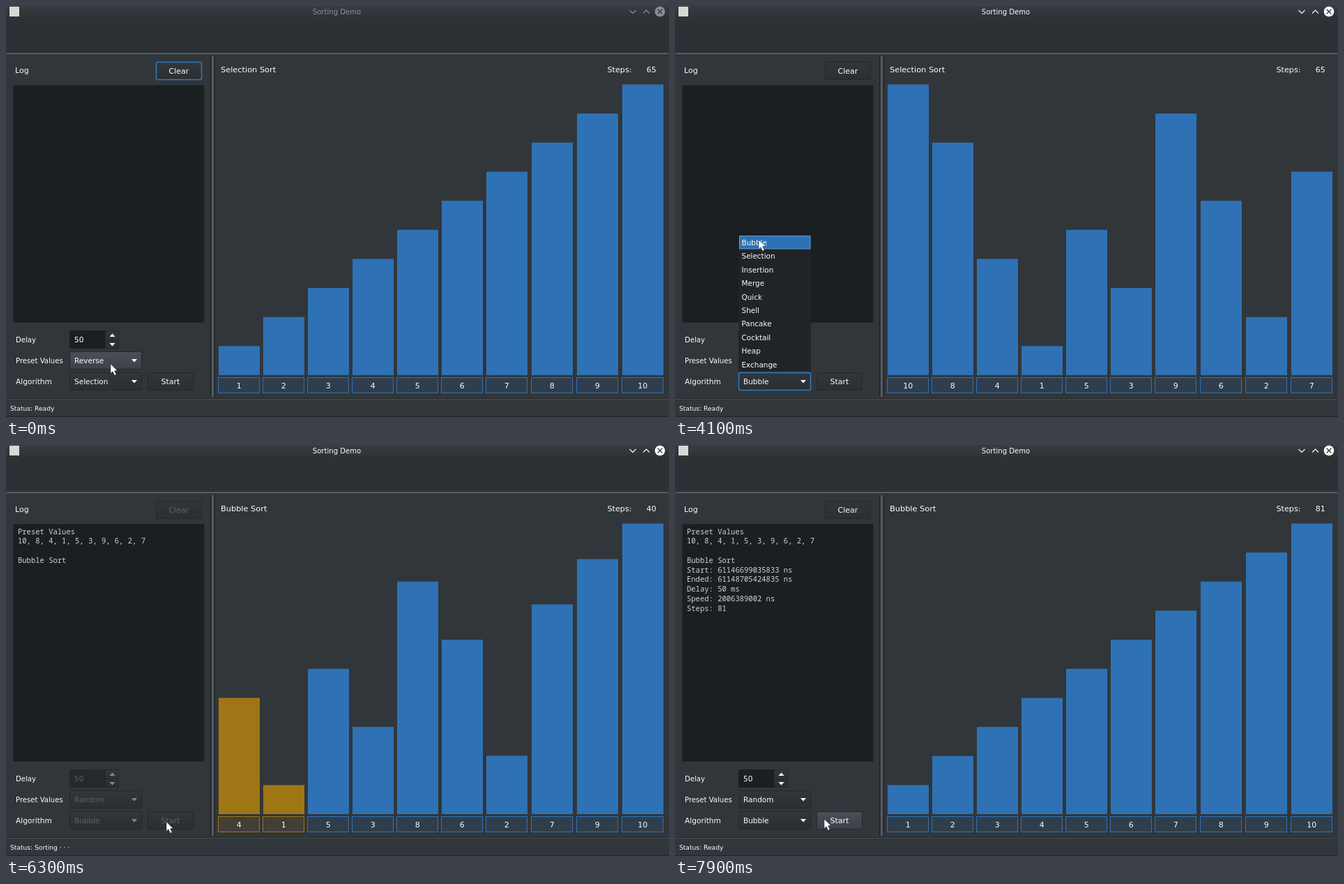
These frames come from a looping animation (951 px wide and 589 px high, 8 s). An HTML page:

```html
<!DOCTYPE html>
<html lang="en">
<head>
<meta charset="utf-8">
<title>Sorting Demo</title>
<style>
  html, body { margin: 0; width: 100%; height: 100%; overflow: hidden; background: #31363a; }
  svg { display: block; width: 951px; height: 589px; }
  text { font-family: "DejaVu Sans", sans-serif; fill: #fcfcfc; white-space: pre; }
  .mono { font: 10.53px "Noto Sans Mono", monospace; fill: #cfd3d5; }
  .mid { text-anchor: middle; }
  .end { text-anchor: end; }
</style>
</head>
<body>
<svg viewBox="0 0 951 589">
  <defs>
    <linearGradient id="bar" x2="0" y2="1">
      <stop offset="0" stop-color="#373c41"/><stop offset="1" stop-color="#2d3135"/>
    </linearGradient>
    <linearGradient id="btn" x2="0" y2="1">
      <stop offset="0" stop-color="#32363a"/><stop offset="1" stop-color="#2b2f33"/>
    </linearGradient>
    <linearGradient id="lit" x2="0" y2="1">
      <stop offset="0" stop-color="#4a4f57"/><stop offset="1" stop-color="#3c4148"/>
    </linearGradient>
  </defs>
  <rect width="951" height="589" fill="#31363a"/>
  <rect width="951" height="19" fill="url(#bar)"/>
  <rect y="19" width="951" height="49" fill="#2d3034"/>
  <rect x="1" y="67.5" width="949" height="1.2" fill="#75787a"/>
  <rect x="5" y="1" width="14" height="14" fill="#d9d8d6"/>
  <rect x="293" y="72" width="1" height="488" fill="#1f2326"/>
  <rect x="295" y="72" width="3" height="488" fill="#54585b"/>
  <rect x="299" y="72" width="1" height="488" fill="#1f2326"/>
  <rect y="562" width="951" height="1" fill="#24282b"/>
  <rect y="563" width="951" height="1" fill="#4b5053"/>
  <rect y="588" width="951" height="1" fill="#202427"/>
  <rect x="10.5" y="113.5" width="274" height="340" rx="1" fill="#1a2022" stroke="#24292c"/>
  <text x="13" y="95.5" font-size="11">Log</text>
  <text x="14" y="482" font-size="10.1">Delay</text>
  <text x="14" y="512" font-size="10.1">Preset Values</text>
  <text x="14" y="542" font-size="10.6">Algorithm</text>
  <text x="862.5" y="94.5" font-size="11.2">Steps:</text>
  <g id="live"></g>
</svg>
<script>
const LOOP = 8000, TICK = 100;
const BLUE = '#2e72b5', GOLD = '#a07516', FOCUS = '#2f7cbd';
const PRESETS = ['Random', 'Ordered', 'Reverse', 'Hundreds', 'Thousands'];
const SORTS = ['Bubble', 'Selection', 'Insertion', 'Merge', 'Quick', 'Shell',
  'Pancake', 'Cocktail', 'Heap', 'Exchange'];
const SHUFFLED = [10, 8, 4, 1, 5, 3, 9, 6, 2, 7];
const SHUFFLE_AT = 1370, SORT_AT = 5286, STEP = 25.2, SORT_UI = 5350, DONE = 7330;
const LAG = 108, GLOW = 6, EASE = 11;
const ROW = 19.45;

// Pointer positions: time, x, y
const PATH = [
  [0, 150, 513], [200, 150, 513], [900, 133, 427], [1100, 130, 407], [1400, 130, 406],
  [2100, 172, 529], [2300, 158, 540], [2400, 158, 540], [2600, 176, 541], [2800, 176, 541],
  [2900, 174, 543], [3100, 174, 543], [3700, 128, 351], [4000, 120, 335], [4300, 120, 335],
  [5100, 230, 540], [7200, 230, 540], [7600, 214, 536], [8000, 214, 536]
];

// Every pass, comparison and swap counts as one step
function bubbleSteps(list) {
  const a = [...list], swaps = [];
  let step = 0;
  for (let end = a.length - 1; end >= 0; end--) {
    step++;
    for (let i = 0; i < end; i++) {
      step++;
      if (a[i] > a[i + 1]) {
        [a[i], a[i + 1]] = [a[i + 1], a[i]];
        swaps.push({ i, at: SORT_AT + ++step * STEP });
      }
    }
  }
  return { swaps, total: step };
}
const { swaps, total } = bubbleSteps(SHUFFLED);

function pointer(t) {
  const n = PATH.findIndex(p => p[0] > t);
  const [t0, x0, y0] = PATH[n - 1], [t1, x1, y1] = PATH[n];
  const k = (t - t0) / (t1 - t0);
  return [x0 + (x1 - x0) * k, y0 + (y1 - y0) * k];
}

function barsAt(t) {
  const bars = SHUFFLED.map((_, i) => ({ value: i + 1, from: i + 1, at: -1e4, hot: false }));
  const height = (b, now) => b.value + (b.from - b.value) * Math.exp((b.at - now) / EASE);
  const set = (b, value, now) => Object.assign(b, { from: height(b, now), value, at: now });
  if (t >= SHUFFLE_AT) bars.forEach((b, i) => set(b, SHUFFLED[i], SHUFFLE_AT));
  for (const { i, at } of swaps) {
    const a = bars[i], b = bars[i + 1], age = t - at;
    if (age >= LAG) {
      const v = a.value;
      set(a, b.value, at + LAG);
      set(b, v, at + LAG);
    } else if (age >= GLOW) a.hot = b.hot = true;
  }
  bars.forEach(b => b.height = height(b, t));
  return bars;
}

const rect = (x, y, w, h, fill, more = '') =>
  `<rect x="${x}" y="${y}" width="${w}" height="${h}" fill="${fill}" ${more}/>`;
const text = (x, y, size, str, cls = '', fill = '') =>
  `<text x="${x}" y="${y}" font-size="${size}" class="${cls}" ${fill && `style="fill:${fill}"`}>${str}</text>`;
const arrow = (x, y, dir, fill) =>
  `<path d="M${x - 4} ${y - 2 * dir}h8l-4 ${4.5 * dir}z" fill="${fill}"/>`;

function frame(x, y, w, h, { focus, lit }) {
  const edge = focus ? FOCUS : '#24282b';
  return rect(x + .5, y + .5, w - 1, h - 1, lit ? 'url(#lit)' : 'url(#btn)',
    `rx="2" stroke="${edge}" stroke-width="${focus ? 1.5 : 1}"`);
}
const ink = off => off ? '#5c6164' : '#fcfcfc';

function button(x, y, w, label, s) {
  return frame(x, y, w, 26, s) + text(x + w / 2, y + 17.3, 11, label, 'mid', ink(s.off));
}
function combo(y, label, s) {
  return frame(91, y, 104, 26, s) + text(98, y + 16.5, 10.5, label, '', ink(s.off)) +
    arrow(184, y + 13, 1, s.off ? '#85898c' : '#fcfcfc');
}
function spin(off) {
  const tip = off ? '#85898c' : '#fcfcfc';
  return rect(91, 465, 51, 26, off ? '#25292c' : '#1a2022') +
    rect(142.5, 465.5, 19, 25, 'url(#btn)', 'stroke="#24282b"') +
    rect(143, 478, 19, 1, '#24282b') +
    text(98, 482, 10.6, '50', '', ink(off)) +
    arrow(152.5, 472, -1, tip) + arrow(152.5, 485, 1, tip);
}
function popup(top, items, current, cy) {
  const over = Math.floor((cy - top) / ROW);
  let out = rect(91.5, top, 103.5, items.length * ROW, '#202427');
  items.forEach((label, i) => {
    const y = top + i * ROW;
    if (i === current) out += rect(92.5, y + .5, 101.5, ROW - 1, BLUE, 'stroke="#5b9bd5"');
    else if (i === over) out += rect(92, y, 102.5, ROW, BLUE);
    out += text(95.5, y + 13.7, 10.45, label);
  });
  return out;
}

function titleBar(active) {
  const c = active ? '#fcfcfc' : '#8b8f92';
  return text(474.5, 12, 10.1, 'Sorting Demo', 'mid', c) +
    `<path d="M894.5 6l4.5 4.5 4.5-4.5M914 10.5l4.5-4.5 4.5 4.5" fill="none" stroke="${c}" stroke-width="1.1"/>` +
    `<circle cx="938" cy="8" r="7.3" fill="${c}"/>` +
    '<path d="M934.7 4.7l6.6 6.6m0-6.6l-6.6 6.6" stroke="#2f3438" stroke-width="1.3"/>';
}

function chart(t) {
  return barsAt(t).map((b, i) => {
    const x = 305 + 64 * i + Math.max(0, i - 6), h = b.height * 41.65;
    const color = b.hot ? GOLD : BLUE;
    return rect(x, 529 - h, 59, h, color) +
      rect(x - .5, 532.5, 59, 22, b.hot ? '#443e35' : '#2f3e4d', `stroke="${color}"`) +
      text(x + 29.2, 548, 11, b.value, 'mid');
  }).join('');
}

function log(t) {
  const lines = ['Preset Values', SHUFFLED.join(', '), '', 'Bubble Sort'];
  if (t >= DONE) lines.push('Start: 61146699035833 ns', 'Ended: 61148705424835 ns',
    'Delay: 50 ms', 'Speed: 2006389002 ns', `Steps: ${total}`);
  return lines.map((s, i) => `<text x="17" y="${127.6 + i * 13.75}" class="mono">${s}</text>`).join('');
}

function status(t, sorting) {
  if (!sorting) return 'Status: Ready';
  return 'Status: Sorting' + ' ·'.repeat(1 + Math.floor((t - 5300) / 500) % 3);
}

function scene(t) {
  const [cx, cy] = pointer(t);
  const started = t >= SORT_UI, off = started && t < DONE;
  const state = (x, y, w, focus) => ({
    off, focus,
    lit: !off && !focus && cx >= x && cx < x + w && cy >= y && cy < y + 26
  });
  const during = (a, b) => t >= a && t < b;
  const steps = started ? Math.min(total, Math.floor((t - SORT_AT) / STEP)) : 65;

  let out = titleBar(t >= 200) +
    text(308, 94.5, 11.35, (started ? 'Bubble' : 'Selection') + ' Sort') +
    text(932.8, 94.5, 11, steps, 'end') +
    text(6, 580.3, 9.15, status(t, off)) +
    button(215, 80, 66, 'Clear', state(215, 80, 66, t < 200)) +
    spin(off) +
    combo(495, t < 1400 ? 'Reverse' : 'Random', state(91, 495, 104, during(200, 2900))) +
    combo(525, t < 4100 ? 'Selection' : 'Bubble', state(91, 525, 104, during(2900, 5200))) +
    button(203, 525, 66, 'Start', state(203, 525, 66, during(5200, SORT_UI))) +
    chart(t);

  if (started) out += log(t);
  if (started && Math.floor((t - 5400) / 500) % 2 === 0) out += rect(331, 537, 1, 13, '#fcfcfc');
  if (during(200, 1400)) out += popup(396, PRESETS, 2, cy);
  if (during(3000, 4300)) out += popup(329, SORTS, t < 4100 ? 1 : 0, cy);
  // The open list covers the preset box beside it
  return out + `<path transform="translate(${cx} ${cy})" fill="#fff" stroke="#2a2e31" stroke-width=".6"
    d="M0 0v13.5l3-2.8 2.6 5.6 2.6-1.2-2.6-5.4 4.2-.2z"/>`;
}

const live = document.getElementById('live');
let shown = -1;
function draw(now) {
  const t = Math.floor((now + 2) % LOOP / TICK) * TICK;
  if (t !== shown) live.innerHTML = scene(shown = t);
  requestAnimationFrame(draw);
}
draw(0);
</script>
</body>
</html>
```
